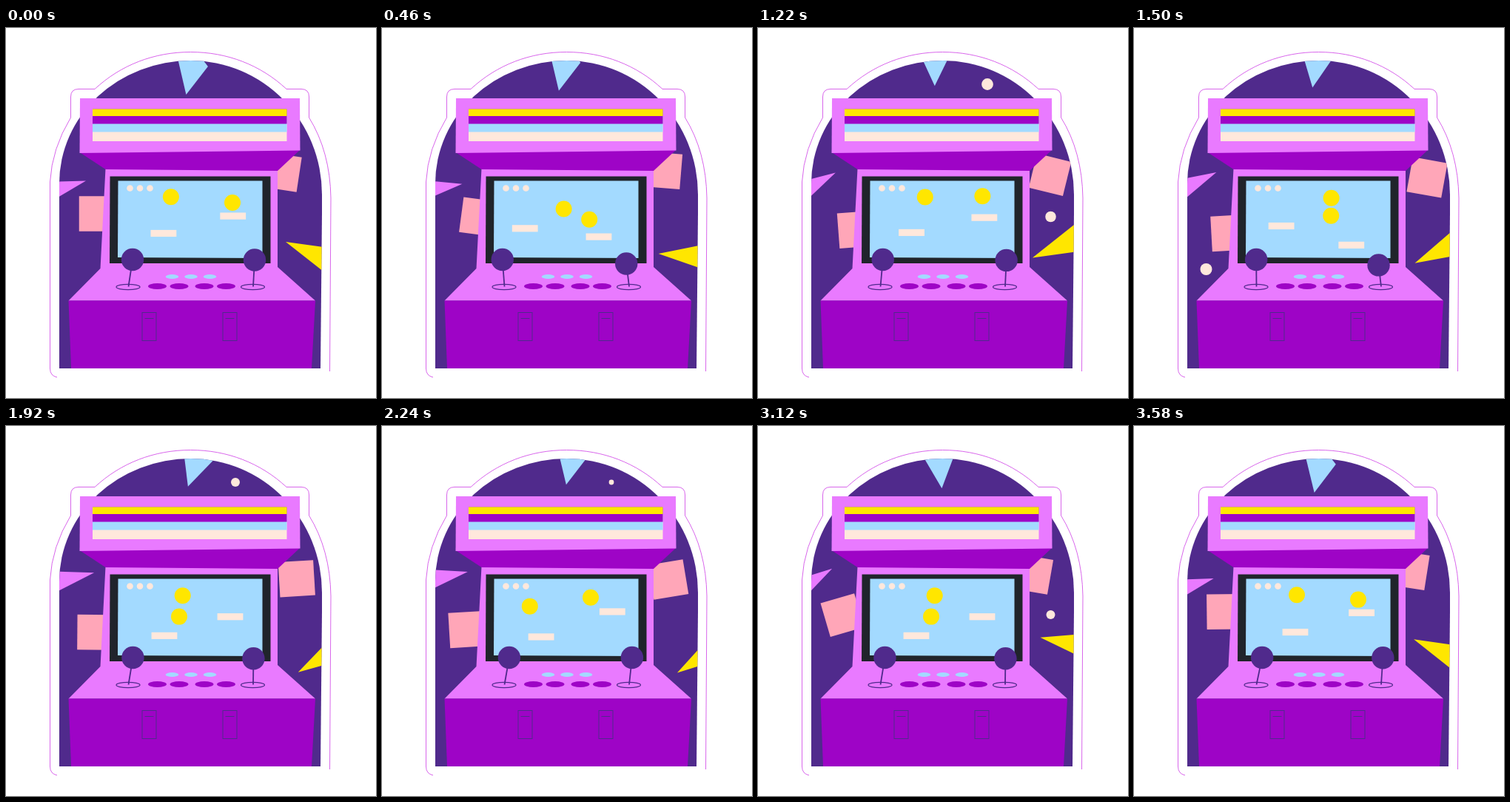
Animation, 500 px wide and 500 px high, one loop 3.6 s. Source, as an HTML page with a canvas:

```html
<!DOCTYPE html>
<html lang="en">
<head>
<meta charset="utf-8">
<title>Arcade cabinet</title>
<style>
html, body { margin: 0; width: 100%; height: 100%; overflow: hidden; background: #fff; }
canvas { display: block; width: 500px; height: 500px; }
</style>
</head>
<body>
<canvas id="stage" width="500" height="500"></canvas>
<script>
const ctx = document.getElementById('stage').getContext('2d');
const LOOP = 3600, GAME = 1200, STEP = 20, POP = 540;
const C = {
  dark: '#502a8c', purple: '#9e04c6', violet: '#e97aff', yellow: '#ffe600',
  blue: '#a3daff', cream: '#ffe8dc', pink: '#ffa6b8', black: '#20242b', edge: '#cf3fe6'
};
const rad = deg => deg * Math.PI / 180;
// Cosine of an angle in degrees.
const cos = deg => Math.cos(rad(deg));

function fillPoly(color, ...pts) {
  ctx.fillStyle = color;
  ctx.beginPath();
  for (let i = 0; i < pts.length; i += 2) ctx.lineTo(pts[i], pts[i + 1]);
  ctx.fill();
}
function rect(color, x, y, w, h) {
  ctx.fillStyle = color;
  ctx.fillRect(x, y, w, h);
}
function oval(color, x, y, rx, ry = rx) {
  ctx.fillStyle = color;
  ctx.beginPath();
  ctx.ellipse(x, y, rx, ry, 0, 0, 7);
  ctx.fill();
}
function strokeLine(x1, y1, x2, y2) {
  ctx.beginPath();
  ctx.moveTo(x1, y1);
  ctx.lineTo(x2, y2);
  ctx.stroke();
}
function placed(x, y, deg, draw) {
  ctx.save();
  ctx.translate(x, y);
  ctx.rotate(rad(deg));
  draw();
  ctx.restore();
}
// Triangle opening to the right of its tip, with an upper and a lower side.
function wedge(color, x, y, deg, half, upper, lower = upper) {
  const c = cos(half), s = Math.sin(rad(half));
  placed(x, y, deg, () => fillPoly(color, 0, 0, upper * c, -upper * s, lower * c, lower * s));
}
function tile(x, y, deg) {
  placed(x, y, deg, () => rect(C.pink, -23.75, -23.75, 47.5, 47.5));
}
// Dot that swells and shrinks once after its start time.
function pop(t, start, x, y) {
  const u = (t - start) / POP;
  if (u > 0 && u < 1) oval(C.cream, x, y, 8 * Math.sin(Math.PI * u));
}

function stickerEdge() {
  ctx.strokeStyle = C.edge;
  ctx.lineWidth = 0.8;
  ctx.beginPath();
  ctx.moveTo(69, 472);
  ctx.quadraticCurveTo(59.5, 470, 59.5, 460);
  ctx.lineTo(59.5, 208);
  ctx.quadraticCurveTo(62, 163, 87.5, 121);
  ctx.lineTo(87.5, 93);
  ctx.quadraticCurveTo(87.5, 82.5, 98, 82.5);
  ctx.lineTo(120, 82.5);
  ctx.bezierCurveTo(155, 50, 200, 32.5, 249.5, 32.5);
  ctx.bezierCurveTo(299, 32.5, 344, 50, 379, 82.5);
  ctx.lineTo(399, 82.5);
  ctx.quadraticCurveTo(409.5, 82.5, 409.5, 93);
  ctx.lineTo(409.5, 121);
  ctx.quadraticCurveTo(438, 167, 439, 230);
  ctx.lineTo(437.5, 464);
  ctx.stroke();
}

function archPath() {
  ctx.beginPath();
  ctx.moveTo(72, 460);
  ctx.ellipse(249.5, 210, 177.5, 166, 0, Math.PI, 1.5 * Math.PI);
  ctx.ellipse(249.5, 225, 177.5, 181, 0, 1.5 * Math.PI, 2 * Math.PI);
  ctx.lineTo(427, 250);
  ctx.lineTo(425, 460);
}

// Every piece drifts on a slow loop (a) with a sway twice as fast (2a).
function backdrop(t) {
  const a = 360 * t / LOOP;
  ctx.save();
  archPath();
  ctx.clip();
  rect(C.dark, 60, 40, 380, 430);
  wedge(C.blue,
    244 + 6.5 * cos(a - 265),
    82 + 4 * cos(a) + 4 * cos(2 * a),
    -84 + 4 * cos(a - 130) + 10.8 * cos(2 * a - 34), 25.5, 115, 48);
  wedge(C.yellow,
    382 + 13 * cos(a - 240) + 5 * cos(2 * a - 60),
    309 - 20 * cos(a) + 10 * cos(2 * a - 90),
    -10 + 26 * cos(a) + 8 * cos(2 * a + 30), 15.2, 80);
  wedge(C.violet,
    108 - 5 * cos(a) + 6.4 * cos(2 * a - 39),
    199 + 7 * cos(a - 50) + 5.8 * cos(2 * a - 59),
    160 + 2 * cos(a - 90) + 10.8 * cos(2 * a - 68), 14.5, 80);
  tile(
    122.5 + 11.5 * cos(a - 90),
    265 - 14 * cos(a),
    -4 + 8 * cos(a - 90) + 7.2 * cos(2 * a - 56));
  tile(
    383.5 + 12.5 * cos(a - 150),
    200 + 7.5 * cos(a - 225),
    4.6 + 7.2 * cos(a - 56) + 7 * cos(2 * a + 90));
  for (const start of [920, 1775]) pop(t, start, 310, 76);
  for (const start of [875, 2975]) pop(t, start, 395.5, 255);
  pop(t, 1230, 97.5, 326);
  pop(t, 2515, 184.5, 76);
  ctx.restore();
}

function cabinet() {
  fillPoly(C.violet, 134.5, 190, 367, 190, 367, 323, 418, 368.5, 84.5, 368.5, 127.5, 325);
  fillPoly(C.purple, 99.5, 168, 397, 165, 367, 193, 134.5, 191);
  fillPoly(C.violet, 100, 95, 397, 95, 397.5, 165.5, 99.5, 169);
  rect(C.cream, 117, 109.5, 262.5, 43.5);
  rect(C.blue, 117, 109.5, 262.5, 31);
  rect(C.purple, 117, 109.5, 262.5, 20);
  rect(C.yellow, 117, 109.5, 262.5, 9.5);
  fillPoly(C.purple, 84.5, 368.5, 418, 368.5, 413, 460, 88, 460);
  ctx.strokeStyle = C.dark;
  ctx.lineWidth = 1;
  for (const x of [184, 293]) {
    ctx.strokeRect(x, 384.5, 19, 38);
    strokeLine(x + 3.5, 392.5, x + 15.5, 392.5);
  }
  for (let i = -1; i <= 1; i++) oval(C.blue, 250 + 25.5 * i, 336, 8.8, 3);
  for (const side of [-1, 1]) {
    for (const gap of [17, 46.5]) oval(C.purple, 251 + side * gap, 349, 12.5, 4);
  }
}

// Arc from one contact to the next; skew moves the peak earlier (< 1) or later.
function hop(t, from, to, lift, skew) {
  const u = (t - from.t) / (to.t - from.t), v = u ** skew;
  return [
    from.x + (to.x - from.x) * u,
    from.y + (to.y - from.y) * u - 4 * lift * v * (1 - v)
  ];
}
const after = c => ({ ...c, t: c.t + GAME });
const before = c => ({ ...c, t: c.t - GAME });

const hitA = { right: { t: 430, x: 285, y: 274 }, left: { t: 1000, x: 194, y: 270 } };
const hitB = { right: { t: 0, x: 306, y: 236 }, left: { t: 640, x: 222, y: 266 } };

function ballA(t) {
  if (t < hitA.right.t) return hop(t, before(hitA.left), hitA.right, 43, 0.6);
  if (t < hitA.left.t) return hop(t, hitA.right, hitA.left, 44, 0.8);
  return hop(t, hitA.left, after(hitA.right), 43, 0.6);
}
function ballB(t) {
  return t < hitB.left.t
    ? hop(t, hitB.right, hitB.left, 22, 0.6)
    : hop(t, hitB.left, after(hitB.right), 14, 1.3);
}
function leftBar(t) {
  const a = 360 * t / GAME;
  return [
    201 + 16.5 * cos(2 * a + 15) + 14.6 * cos(3 * a + 106),
    277.5 + 10 * cos(a + 90)
  ];
}
function rightBar(t) {
  const a = 360 * t / GAME;
  return [302 + 9.5 * cos(a - 300), 267 + 19 * cos(a - 105) - 8 * cos(2 * a)];
}

function screen(t) {
  fillPoly(C.black, 140.5, 200.5, 357.5, 200.5, 357.5, 318, 140, 318);
  fillPoly(C.blue, 151.5, 206.5, 346.5, 206.5, 346.5, 311, 151, 310);
  for (let i = 0; i < 3; i++) oval(C.cream, 167.5 + 13.5 * i, 216.5, 4.3);
  for (const [x, y] of [leftBar(t), rightBar(t)]) rect(C.cream, x - 17.4, y - 4.6, 34.8, 9.2);
  for (const [x, y] of [ballA(t), ballB(t)]) oval(C.yellow, x, y, 11);
}

function joystick(baseX, x, y) {
  ctx.strokeStyle = C.dark;
  ctx.lineWidth = 1.2;
  ctx.beginPath();
  ctx.ellipse(baseX, 350, 16, 3.6, 0, 0, 7);
  ctx.stroke();
  ctx.lineWidth = 1.8;
  strokeLine(baseX + 0.5, 349.5, x, y);
  oval(C.dark, x, y, 15.2);
}
// Each stick leans the way its bar moves.
function joysticks(t) {
  const [lx] = leftBar(t), [rx, ry] = rightBar(t);
  joystick(165, 166 + 0.42 * (lx - 201), 313);
  joystick(333.5, 334 + 0.42 * (rx - 302), 313 + 0.175 * (ry - 251));
}

function render(now) {
  const t = Math.floor((now % LOOP) / STEP) * STEP;
  rect('#fff', 0, 0, 500, 500);
  stickerEdge();
  backdrop(t);
  cabinet();
  screen(t % GAME);
  joysticks(t % GAME);
}

let began;
function tick(now) {
  began ??= now;
  render(Math.max(0, now - began));
  requestAnimationFrame(tick);
}
render(0);
requestAnimationFrame(tick);
</script>
</body>
</html>
```
